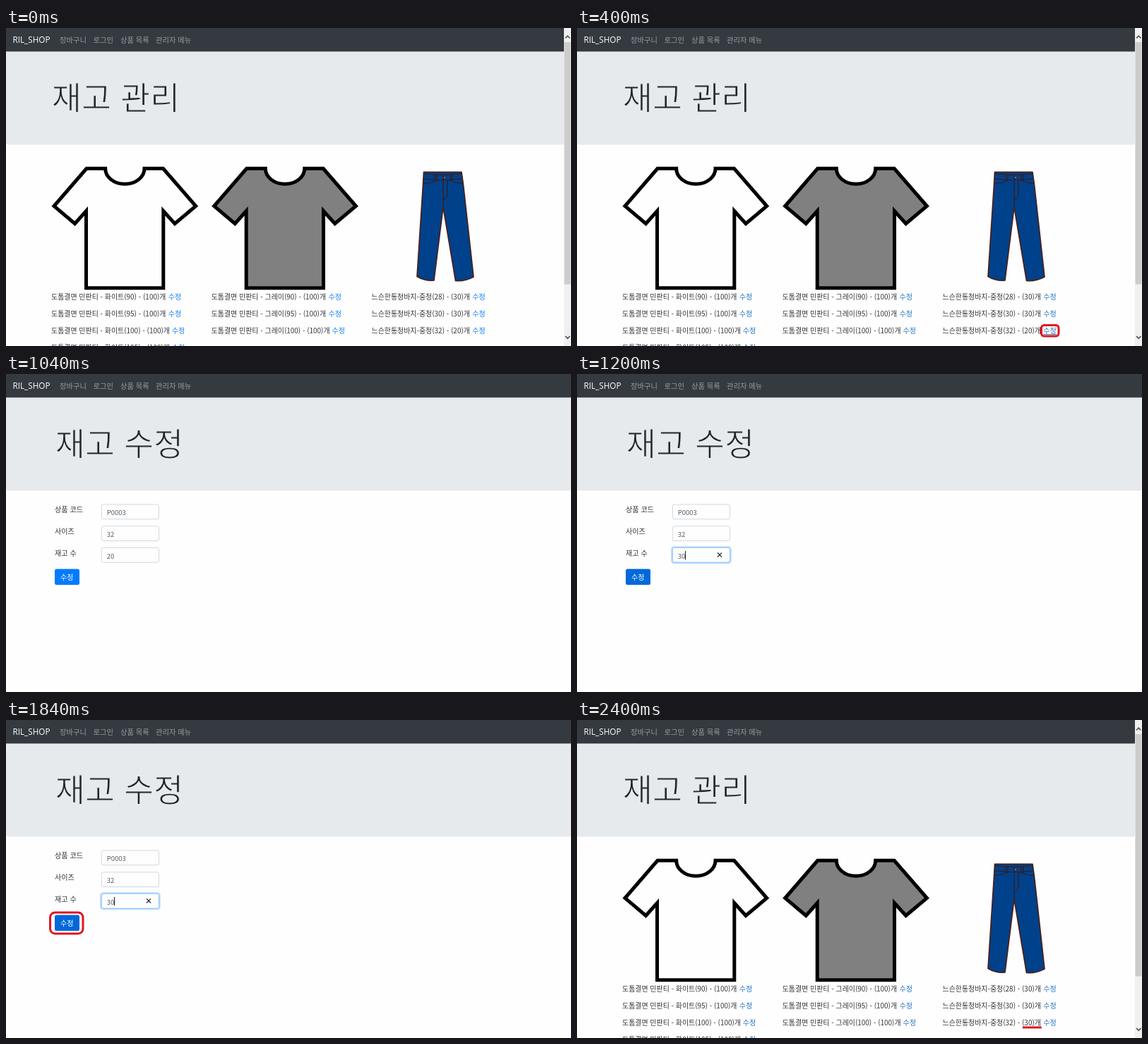
Animation, 800 px wide and 451 px high, one loop 2800 ms. Source, as an HTML page:

```html
<!DOCTYPE html>
<html lang="ko">
<head>
<meta charset="utf-8">
<title>재고 관리</title>
<style>
html, body { margin: 0; width: 100%; height: 100%; overflow: hidden; background: #fefefe; }
svg { display: block; width: 800px; height: 451px; }
text { font: 9.95px "Noto Sans CJK KR", "Noto Sans CJK", "Noto Sans CJK JP", sans-serif; fill: #2f3337; }
.brand { font: 11.7px "Open Sans", "Noto Sans", sans-serif; fill: #fff; }
.nav { font-size: 10.3px; fill: #999c9f; }
/* the background-coloured stroke thins the letters */
.title { font-size: 45.8px; fill: #212529; stroke: #e7eaed; stroke-width: 1.2; }
.label { font-size: 10.1px; }
.link { font-size: 10.1px; fill: #1680f2; }
.dim .link { fill: #2475bd; }
.value { font-size: 9.5px; fill: #555b61; }
.mark { fill: none; stroke: #e3141e; stroke-width: 3; }
</style>
</head>
<body>
<svg id="stage" viewBox="0 0 800 451" xmlns="http://www.w3.org/2000/svg"></svg>
<script>
const stage = document.getElementById('stage');
const STEP = 400, LOOP = 2800;

const text = (x, y, s, cls = '', id = '') =>
  `<text x="${x}" y="${y}" class="${cls}"${id && ` id="${id}"`}>${s}</text>`;

const header = (width, x, title) => `
  <rect width="800" height="451" fill="#fefefe"/>
  <rect y="33" width="${width}" height="132.5" rx="3" fill="#e7eaed"/>
  <rect width="${width}" height="33.4" fill="#343a40"/>
  ${text(9.5, 21.2, 'RIL_SHOP', 'brand')}
  ${[[76, '장바구니'], [123.5, '로그인'], [162, '상품 목록'], [212, '관리자 메뉴']]
    .map(([nx, s]) => text(nx, 21, s, 'nav')).join('')}
  ${text(x, 115.6, title, 'title')}`;

const shirt = (x, fill) => `
  <path transform="translate(${x})" fill="${fill}" stroke="#000" stroke-width="5"
    d="M140.6 199.3H114L68 252.5L97.5 277.5L113.5 259.5V368.8H222.8V259.5L239 277.5L268.7 252.5L222.5 199.3H196A27.7 22 0 0 1 140.6 199.3Z"/>`;

const jeans = `
  <g fill="none" stroke="#3b1a18" stroke-width="1.2" stroke-linejoin="round">
    <path fill="#00418b" stroke="#4a1f18" stroke-width="1.7" d="M591.5 204.3H645L647.5 222L662 353Q650 359.5 636.5 358.5L619 254L606 358Q593 359 582 352.5L590.5 222Z"/>
    <path d="M592 206.5Q619 210 645 206.5M591 213.5Q619 218 646 213.5M619 209V254M625 216V237Q624.5 242 619 243.5"/>
    <path d="M591 220Q605 221 609 215M647 220Q634 221 630 215M607 208V218M610 208V218M629 208V218M632 208V218"/>
    <circle cx="621" cy="212" r="1.6" fill="#887f86" stroke-width=".8"/>
  </g>`;

const row = (x, y, label, linkX, id) =>
  text(x, y, label, '', id) + text(linkX, y, '수정', 'link');

const column = (x, name, sizes) => sizes.map((size, i) =>
  row(x, 385 + i * 24, `${name}(${size}) - (100)개`, x + (size < 100 ? 165.7 : 170.7))).join('');

const scrollbar = `
  <rect x="790" width="10" height="451" fill="#f0f0f0"/>
  <rect x="790.5" y="20" width="9" height="343.5" fill="#cdcdcd"/>
  <path d="M792 14.5L795.2 11.2L798.4 14.5M792 437L795.2 440.3L798.4 437" fill="none" stroke="#505050" stroke-width="1.6"/>`;

const listPage = `<g id="list">
  ${header(790, 64.8, '재고 관리')}
  ${shirt(0, '#fefefe')}${shirt(226.7, '#808080')}${jeans}
  ${column(64, '도톰결면 민판티 - 화이트', [90, 95, 100, 105])}
  ${column(290.7, '도톰결면 민판티 - 그레이', [90, 95, 100])}
  ${[28, 30, 32].map((size, i) =>
    row(517.5, 385 + i * 24, `느슨한통청바지-중청(${size}) - (30)개`, 660.2, 'stock' + size)).join('')}
  ${scrollbar}
  <g id="linkMark">
    <path d="M660.5 434.5H679" stroke="#2475bd" stroke-width=".8"/>
    <rect class="mark" x="657.5" y="421.5" width="24.5" height="15.5" rx="4"/>
  </g>
  <path id="stockMark" class="mark" stroke-linecap="round" d="M632 436H656.5"/>
</g>`;

const field = (y, label, value, id) => `
  ${text(69, y + 11.2, label, 'label')}
  <rect id="${id}Box" x="135.3" y="${y}" width="81.2" height="20.8" rx="2.5" fill="#fefefe" stroke-width=".9" stroke="#ced4da"/>
  ${text(142.7, y + 15.2, value, 'value', id)}`;

const formPage = `<g id="form">
  ${header(800, 69.8, '재고 수정')}
  <rect id="glow" x="133" y="244.2" width="85.8" height="25" rx="4.5" fill="#bfdeff"/>
  ${field(185, '상품 코드', 'P0003', 'code')}
  ${field(215.8, '사이즈', '32', 'size')}
  ${field(246.3, '재고 수', '20', 'count')}
  <path id="caret" d="M153.5 251V263.5M199 253.5L205 259.5M205 253.5L199 259.5" stroke="#222" stroke-width="1.1"/>
  <rect id="button" x="69" y="276.5" width="35" height="22.5" rx="2.5"/>
  <text x="77" y="291.8" class="label" style="fill:#fff">수정</text>
  <rect id="buttonMark" class="mark" x="62.5" y="273" width="46.5" height="30" rx="7"/>
</g>`;

stage.innerHTML = listPage + formPage;

const get = id => document.getElementById(id);
const show = (id, on) => get(id).setAttribute('display', on ? 'inline' : 'none');

function render(ms) {
  const step = Math.floor((ms % LOOP) / STEP);
  const editing = step >= 2 && step <= 4;
  const focused = step === 3 || step === 4;

  show('list', !editing);
  show('form', editing);
  show('linkMark', step === 1);
  show('stockMark', step === 6);
  show('glow', focused);
  show('caret', focused);
  show('buttonMark', step === 4);

  get('list').setAttribute('class', step === 1 || step === 6 ? 'dim' : '');
  get('stock32').textContent = `느슨한통청바지-중청(32) - (${step < 5 ? 20 : 30})개`;
  get('count').textContent = focused ? '30' : '20';
  get('countBox').setAttribute('stroke', focused ? '#80bdff' : '#ced4da');
  get('button').setAttribute('fill', focused ? '#0069d9' : '#007bff');
}

const start = performance.now();
function tick() {
  render(performance.now() - start);
  requestAnimationFrame(tick);
}
tick();
</script>
</body>
</html>
```
